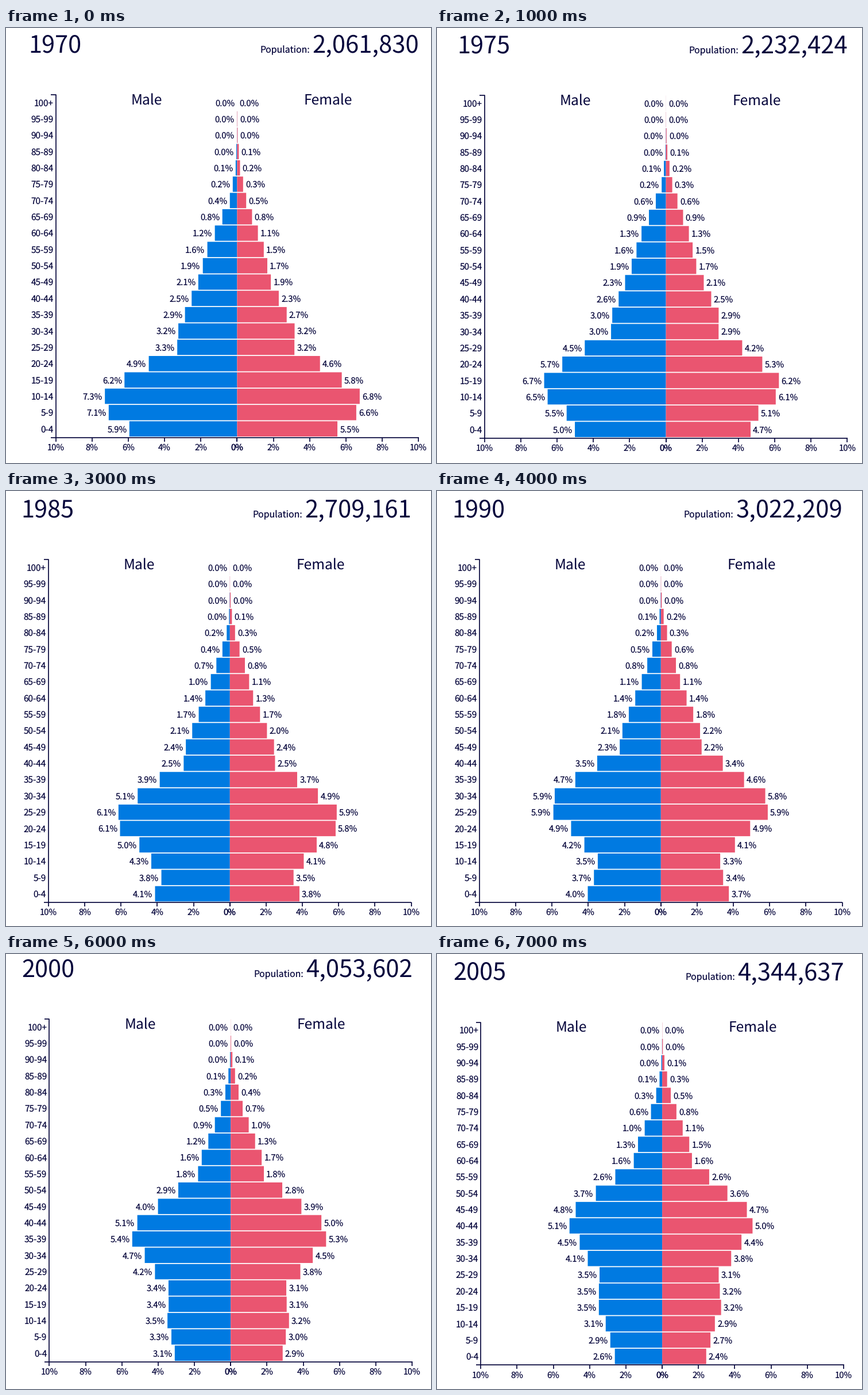
A matplotlib script that plays this animation: 740x756 px, repeating every 8 s.

```python
import matplotlib.pyplot as plt
import numpy as np
from matplotlib.animation import FuncAnimation
from matplotlib.patches import Rectangle

W, H, DPI = 740, 756, 100
NAVY, BLUE, PINK = "#06063c", "#007ae1", "#ea5570"
UNIT = 31.58      # pixels per percent
ROW = 28.35       # pixels per age group
HALF = 10 * UNIT
AGES = np.arange(21)
YEARS = range(1970, 2010, 5)

# Headline counter and chart origin for each year
PEOPLE = [2061830, 2232424, 2400729, 2709161, 3022209, 3525417, 4053602, 4344637]
CENTER = [402.4, 398.6, 390.2, 389.8, 389.8, 392.0, 391.2, 392.1]
BASE = [711.5, 712.5, 715, 714.8, 714.8, 712.6, 708.6, 714.1]

# Key points of the first pyramid, by age group
KNOTS = [0, 1, 2, 3, 4, 5, 6, 9, 11, 14, 16, 18, 20]
MEN = [5.94, 7.08, 7.29, 6.21, 4.87, 3.30, 3.24, 2.14, 1.64, .40, .08, .01, 0]
WOMEN = [5.53, 6.57, 6.76, 5.77, 4.57, 3.16, 3.17, 1.86, 1.47, .50, .16, .03, 0]

# Per five-year step: dilution by population growth, and arrivals of young adults
DILUTION = [.922, .937, .895, .895, .919, .919, .928]
MEN_ARRIVING = [0, 0, .11, .11, .09, .09, .10]
WOMEN_ARRIVING = [0, 0, .15, .15, .06, .06, .11]

plt.rcParams["font.family"] = "Noto Sans CJK JP"
plt.rcParams["text.hinting"] = "no_hinting"


def newborns(year):
    return np.interp(year, [1975, 1980, 1990, 2005], [5.02, 4.22, 4.03, 2.61])


def age_cohorts(start, arriving, birth_ratio, half_life):
    """Move every cohort up one age group per step, with deaths and arrivals."""
    shares = [np.interp(AGES, KNOTS, start)]
    x = AGES / 3
    arrival_shape = (x * np.exp(1 - x)) ** 3
    for step, year in enumerate(YEARS[1:]):
        survival = 1 / (1 + np.exp(0.51 * (AGES - half_life - 0.2 * step)))
        kept = DILUTION[step] * (survival + arriving[step] * arrival_shape)
        older = (shares[-1] * kept)[:-1]
        shares.append(np.append(birth_ratio * newborns(year), older))
    return shares


men = age_cohorts(MEN, MEN_ARRIVING, 1, 15.1)
women = age_cohorts(WOMEN, WOMEN_ARRIVING, 0.93, 16.2)

fig = plt.figure(figsize=(W / DPI, H / DPI), dpi=DPI, facecolor="white")
ax = fig.add_axes([0, 0, 1, 1])


def text(x, y, s, px, ha="left"):
    ax.text(x, y, s, fontsize=px * 72 / DPI, color=NAVY, ha=ha, va="baseline")


def line(xs, ys):
    ax.plot(xs, ys, color=NAVY, lw=1.7 * 72 / DPI, solid_capstyle="butt")


def age_label(k):
    return "100+" if k == AGES[-1] else f"{5 * k}-{5 * k + 4}"


def draw_axes(cx, base):
    left, top = cx - HALF, base - 595.5
    line([left - 8.5, left, left], [top, top, base])
    line([left - 8.5, cx + HALF + 0.8], [base, base])
    for side in (-1, 1):
        for pct in range(0, 11, 2):
            x = cx + side * pct * UNIT
            line([x, x], [base, base + 7])
            text(x, base + 22.5, f"{pct}%", 14.8, "center")


def draw_row(k, cx, base, male, female):
    mid = base - 14.8 - k * ROW
    for share, side, color, ha in ((male, -1, BLUE, "right"), (female, 1, PINK, "left")):
        tip = side * share * UNIT
        ax.add_patch(Rectangle((cx, mid - 13.3), tip, 26.6, fc=color, lw=0, snap=False))
        text(cx + tip + side * 4.3, mid + 5.7, f"{share:.1f}%", 14.8, ha)
    text(cx - HALF - 4, mid + 5.7, age_label(k), 15.3, "right")


def draw(i):
    cx, base = CENTER[i], BASE[i]
    ax.clear()
    ax.set(xlim=(0, W), ylim=(H, 0))
    ax.axis("off")
    head = base - 668.5
    text(cx - 363.5, head, str(YEARS[i]), 41.5)
    text(cx + 40, head, "Population:", 15.9)
    text(cx + 316.5, head, f"{PEOPLE[i]:,}", 41.8, "right")
    for side, name in ((-1, "Male"), (1, "Female")):
        text(cx + side * HALF / 2, base - 579, name, 24.6, "center")
    for k in AGES:
        draw_row(k, cx, base, men[i][k], women[i][k])
    draw_axes(cx, base)
    return []


anim = FuncAnimation(fig, draw, frames=len(YEARS), interval=1000, repeat=True,
                     repeat_delay=0, init_func=lambda: draw(0), blit=False)
plt.show()
```
